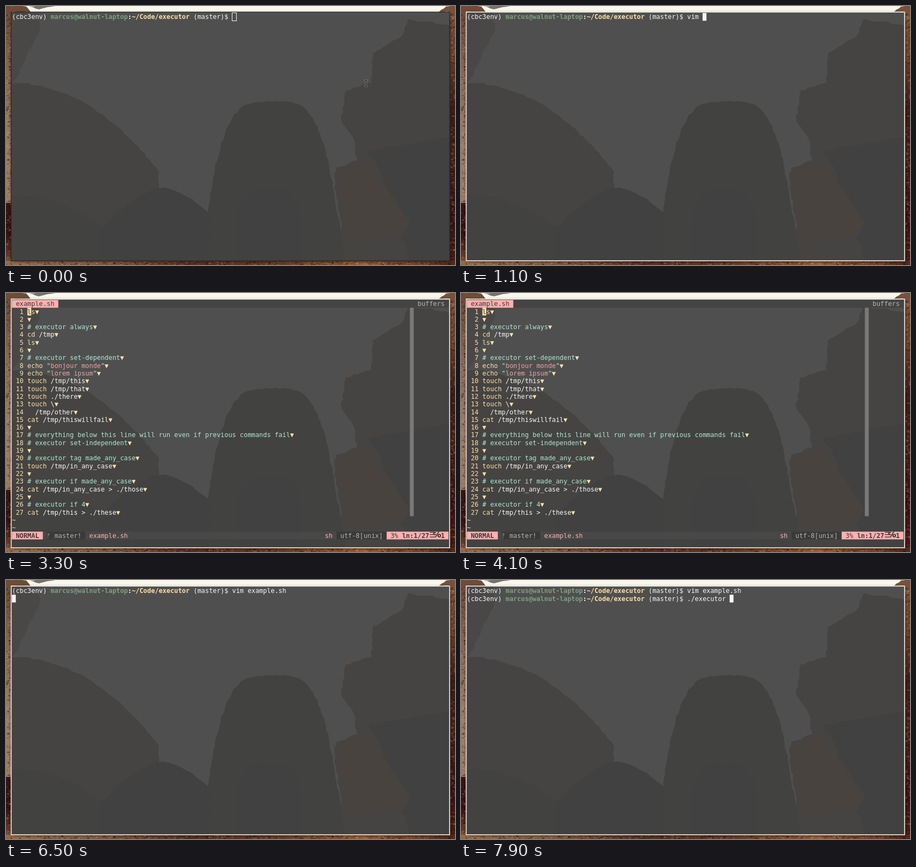
Write an HTML page with a canvas that moves like this. It is 831 px wide and 480 px high and loops after 8 s.

```html
<!DOCTYPE html>
<html lang="en">
<head>
<meta charset="utf-8">
<title>Terminal session</title>
<style>
html, body { margin: 0; width: 100%; height: 100%; overflow: hidden; background: #f7f5ea; }
canvas { display: block; }
</style>
</head>
<body>
<canvas id="stage" width="831" height="480"></canvas>
<script>
const W = 831, H = 480, LOOP = 8000;
const CELL = 7.15, LINE = 14.31, LEFT = 11, TOP = 13;
const WHITE = '#f8f8f4', CREAM = '#ffdfa5', PINK = '#ffafaf', MINT = '#afe8d2', GREY = '#b4b4b4', DARK = '#3a3a3a';
const FONT = '11.88px "DejaVu Sans Mono", monospace';
const FOCUS = 400, COMMAND = 700, FILE = 1500, ENTER = 2700, OPEN = 2900, QUIT = 6400, PROMPT = 6600, RUN = 7000;
const KEY = 120;

const SCRIPT = `ls

# executor always
cd /tmp
ls

# executor set-dependent
echo "bonjour monde"
echo "lorem ipsum"
touch /tmp/this
touch /tmp/that
touch ./there
touch \\
  /tmp/other
cat /tmp/thiswillfail

# everything below this line will run even if previous commands fail
# executor set-independent

# executor tag made_any_case
touch /tmp/in_any_case

# executor if made_any_case
cat /tmp/in_any_case > ./those

# executor if 4
cat /tmp/this > ./these`.split('\n');

const stage = document.getElementById('stage').getContext('2d');
let g = stage;

let seed = 7;
const random = () => (seed = seed * 16807 % 2147483647) / 2147483647;
const jitter = size => (random() - .5) * size;
const x = col => LEFT + col * CELL;
const y = row => TOP + row * LINE;

function rect(color, ...box) {
  g.fillStyle = color;
  g.fillRect(...box);
}

function strip(px, py, w, h, ...colors) {
  const fill = g.createLinearGradient(px, py, w > h ? px + w : px, w > h ? py : py + h);
  colors.forEach((c, i) => fill.addColorStop(i / (colors.length - 1), c));
  rect(fill, px, py, w, h);
}

// Fills a polygon whose edges are roughened by small random steps.
function crag(color, points, rough = 4) {
  g.fillStyle = color;
  g.beginPath();
  points.forEach(([ax, ay], i) => {
    const [bx, by] = points[(i + 1) % points.length];
    const steps = Math.ceil(Math.hypot(bx - ax, by - ay) / 9);
    for (let k = 0; k < steps; k++) {
      const u = k / steps;
      g.lineTo(ax + (bx - ax) * u + jitter(rough), ay + (by - ay) * u + jitter(rough));
    }
  });
  g.fill();
}

// A rounded rock: the outline falls off from its top as a power curve.
function mound(color, cx, top, half, drop, power, lean = 0) {
  const points = [[cx - half, H]];
  for (let u = -1; u <= 1; u += .1) points.push([cx + u * half, top + drop * Math.abs(u) ** power]);
  crag(color, [...points, [cx + half, top + drop], [cx + half + lean, H]], 3);
}

function specks(px, py, w, h) {
  for (let n = w * h / 14; n > 0; n--) {
    const color = random() < .6 ? 'rgba(25,8,5,.3)' : 'rgba(225,180,140,.25)';
    rect(color, px + random() * w, py + random() * h, 1 + random() * 4, 1 + random() * 2);
  }
}

function wallpaper() {
  rect('#f9f7ec', 0, 0, W, H);
  strip(0, 0, 10, 365, '#6d4834', '#8a6650', '#9c7b65', '#a07a60');
  strip(0, 365, 10, 115, '#3d1212', '#34100f', '#7b4a30');
  strip(821, 0, 10, H, '#7a5236', '#6a3d26', '#3b1c17', '#48211a', '#3a1212', '#4a1d14');
  strip(0, 472, W, 8, '#9a6a45', '#8a5a3a', '#5c2d1c', '#6b3820', '#a05a2c', '#5a2818');
  specks(0, 0, 9, H);
  specks(822, 0, 9, H);
  specks(0, 473, W, 7);
  crag('#6e4c36', [[0, 0], [38, 0], [47, 11], [0, 11]], 2);
  crag('#77716a', [[42, 0], [92, 0], [62, 6]], 2);
  crag('#78513a', [[W, 0], [815, 0], [800, 11], [W, 11]], 2);
}

function terminal() {
  const rock = '#454442', shade = '#414141';
  g.shadowColor = 'rgba(0,0,0,.5)';
  g.shadowBlur = 4;
  g.shadowOffsetY = 1;
  rect('#4f4f4f', 9, 11, 813, 462);
  g.shadowColor = 'transparent';
  g.beginPath();
  g.rect(9, 11, 813, 462);
  g.clip();
  crag('#494847', [[0, 0], [60, 11], [62, 48], [36, 95], [20, 132], [0, 150]]);
  mound(rock, 0, 142, 283, 165, 2.2);
  mound('#424241', 20, 350, 170, 70, 2);
  mound(shade, 290, 336, 118, 80, 1.6);
  mound('#424241', 493, 177, 118, 190, 4, 20);
  mound(shade, 487, 340, 60, 60, 5);
  crag(rock, [[W, 36], [745, 25], [733, 55], [678, 88], [676, 142], [628, 158], [620, 212],
    [646, 250], [649, 284], [606, 310], [630, H], [W, H]]);
  crag(shade, [[668, 270], [W, 240], [W, H], [750, H], [690, 300]]);
  crag('#48433f', [[610, 298], [670, 288], [748, 400], [735, 425], [628, 440]]);
}

// The backdrop never changes, so it is painted once.
const scene = document.createElement('canvas');
scene.width = W;
scene.height = H;
g = scene.getContext('2d');
wallpaper();
terminal();
g = stage;

function cells(row, col, count, color) {
  rect(color, x(col), y(row), count * CELL, LINE);
}

// Writes on the character grid and returns the next free column.
function put(row, col, text, color, bold) {
  g.font = (bold ? 'bold ' : '') + FONT;
  g.fillStyle = color;
  for (const ch of text) g.fillText(ch, x(col++), y(row) + 11.2);
  return col;
}

// Types a few keys one by one, then completes the rest at once.
function typed(text, start, keys, t) {
  const count = Math.max(0, Math.floor((t - start) / KEY) + 1);
  return count > keys ? text : text.slice(0, count);
}

function prompt(row, command) {
  let col = put(row, 0, '(cbc3env) ', WHITE);
  col = put(row, col, 'marcus@walnut-laptop', '#7f9f7f', true);
  col = put(row, col, ':', WHITE, true);
  col = put(row, col, '~/Code/executor', CREAM, true);
  return put(row, col, ' (master)$ ' + command, WHITE);
}

function pointer() {
  const bar = (color, grow) => {
    rect(color, 664 - grow, 137 - grow, 5 + 2 * grow, 1 + 2 * grow);
    rect(color, 664 - grow, 148 - grow, 5 + 2 * grow, 1 + 2 * grow);
    rect(color, 666 - grow, 137, 1 + 2 * grow, 11);
  };
  bar('#999', .6);
  bar('#151515', 0);
}

function shell(t) {
  let row = 0;
  let col = prompt(0, typed('vim ', COMMAND, 4, t) + typed('example.sh ', FILE, 2, t));
  if (t >= ENTER) [row, col] = [1, 0];
  if (t >= PROMPT) col = prompt(1, typed('./executor ', RUN, 4, t));
  if (t >= FOCUS) cells(row, col, 1, WHITE);
  else {
    g.strokeStyle = WHITE;
    g.lineWidth = 1;
    g.strokeRect(418.5, 12.5, 8, 15);
  }
  if (t < COMMAND) pointer();
}

function codeLine(text, row) {
  put(row, 0, String(row).padStart(3), CREAM);
  let col = 4;
  if (text[0] == '#') col = put(row, col, text, MINT);
  else {
    const [, command, rest] = text.match(/^(\w*)(.*)$/);
    col = put(row, col, command, CREAM);
    for (const part of rest.split(/(")/)) {
      const color = part == '"' ? MINT : command == 'echo' ? '#eda3a3' : WHITE;
      col = put(row, col, part, color);
    }
  }
  put(row, col, '▼', '#ffe5aa');
}

function statusLine(row) {
  cells(row, 0, 113, '#484848');
  cells(row, 0, 8, PINK);
  cells(row, 9, 10, DARK);
  cells(row, 84, 13, DARK);
  cells(row, 97, 16, PINK);
  put(row, 1, 'NORMAL', DARK, true);
  put(row, 9, 'ᚠ master!', GREY);
  put(row, 20, 'example.sh', PINK);
  put(row, 81, 'sh', PINK);
  put(row, 85, 'utf-8[unix]', GREY);
  put(row, 98, '3%', DARK);
  put(row, 101, 'ln:1/27', DARK, true);
  g.font = 'bold 14px "DejaVu Sans", sans-serif';
  g.fillText('☰', x(108), y(row) + 11);
  g.fillText('℅', x(109), y(row) + 11);
  put(row, 111, '1', DARK, true);
}

function editor() {
  cells(0, 0, 113, '#444');
  cells(0, 0, 12, PINK);
  put(0, 1, 'example.sh', DARK);
  put(0, 105, 'buffers', GREY);
  rect('#797979', x(103), y(1), CELL, 27 * LINE);
  SCRIPT.forEach((text, i) => codeLine(text, i + 1));
  cells(1, 4, 1, CREAM);
  put(1, 4, 'l', DARK);
  put(28, 0, '~', CREAM);
  put(29, 0, '~', CREAM);
  statusLine(30);
}

function border(focused) {
  g.lineWidth = focused ? 1.6 : 1.3;
  g.strokeStyle = focused ? '#f0f0e8' : '#292929';
  g.strokeRect(9.6, 11.3, 811.4, 460.9);
}

function draw(now) {
  const t = now % LOOP;
  g.drawImage(scene, 0, 0);
  if (t >= OPEN && t < QUIT) editor();
  else shell(t);
  border(t >= FOCUS);
  requestAnimationFrame(draw);
}
requestAnimationFrame(draw);
</script>
</body>
</html>
```
